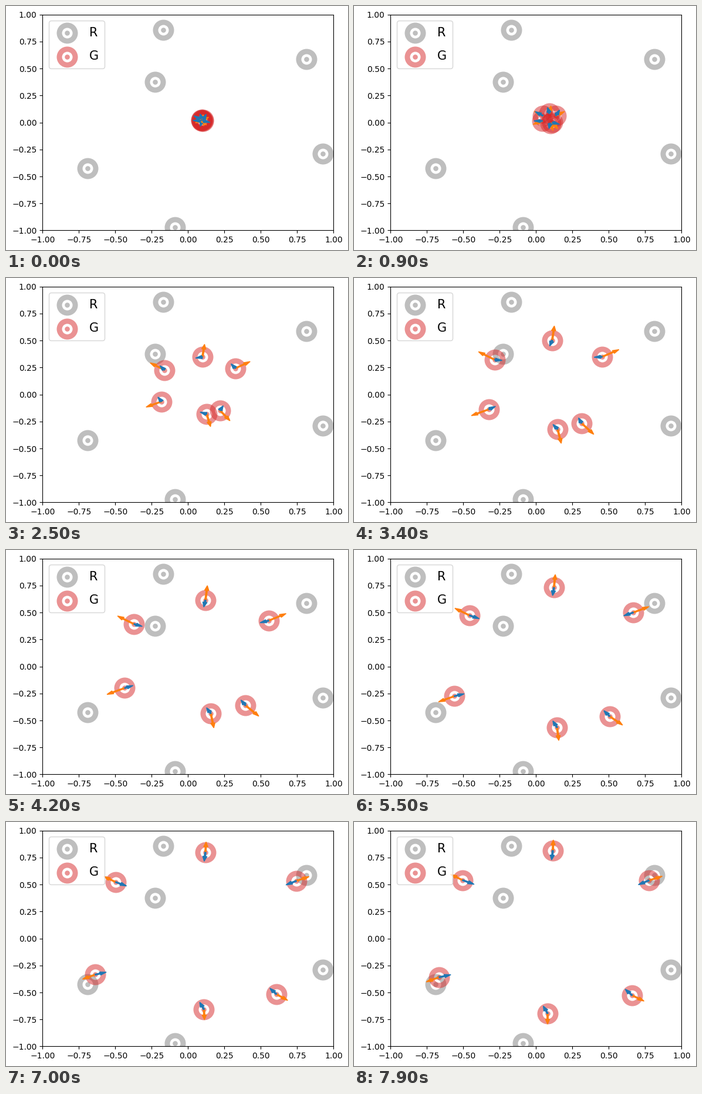
Animation, 583 px wide and 418 px high, one loop 8000 ms. Source, as a matplotlib script:

```python
import numpy as np
import matplotlib.pyplot as plt
from matplotlib.animation import FuncAnimation
from matplotlib.path import Path

W, H, DPI = 583, 418, 100
FRAMES, STEP = 80, 100

KEYS = np.array([16, 34, 42, 55, 70, 79]) / 79
START = np.array([0.097, 0.020])

RESOURCES = [(-0.171, 0.858), (0.813, 0.590), (-0.227, 0.376),
             (0.926, -0.289), (-0.691, -0.424), (-0.090, -0.973)]

# Per agent: waypoints, velocity heading (first, last), force (first, last)
AGENTS = [
    dict(x=[-.034, -.284, -.373, -.457, -.498, -.505],
         y=[.128, .323, .393, .474, .523, .541],
         heading=(146, 147), force=[(-.013, .010), (.039, -.019)]),
    dict(x=[-.042, -.324, -.437, -.562, -.639, -.667],
         y=[-.008, -.137, -.200, -.275, -.335, -.359],
         heading=(206, 206), force=[(-.010, .001), (.038, .011)]),
    dict(x=[.091, .111, .119, .123, .119, .115],
         y=[.187, .501, .617, .731, .799, .815],
         heading=(82, 88), force=[(-.003, .008), (-.004, -.042)]),
    dict(x=[.204, .454, .555, .668, .744, .777],
         y=[.133, .350, .425, .501, .534, .539],
         heading=(33, 23), force=[(.003, .010), (-.035, -.019)]),
    dict(x=[.107, .148, .156, .144, .109, .079],
         y=[-.062, -.321, -.435, -.565, -.657, -.695],
         heading=(-75, -90), force=[(-.002, -.004), (-.012, .028)]),
    dict(x=[.144, .313, .394, .506, .607, .660],
         y=[-.045, -.267, -.359, -.462, -.516, -.527],
         heading=(-58, -33), force=[(.006, -.001), (-.019, .023)]),
]

# Smooth curves for speed and for the turn of the force
ALL_KEYS = np.r_[0, KEYS]
SPEED = np.polyfit(ALL_KEYS, [.001, .047, .094, .088, .073, .055, .052], 4)
TURN = np.polyfit(ALL_KEYS, [-.05, 0, .37, .55, .75, .92, 1], 4)


def path_fit(points):
    """Track that leaves its start from rest: start + u^2 * poly(u)."""
    start = START + 0.008 * (points[-1] - START)
    poly = np.polyfit(KEYS, (points - start) / KEYS[:, None] ** 2, 4, w=KEYS ** 2)
    return start, poly


def target_marker():
    """Ring with a dot in the middle, as one filled path."""
    circle = Path.unit_circle()
    scales = [(18, 18), (-9, 9), (4.3, 4.3)]
    return Path.make_compound_path(
        *[Path(circle.vertices * s, circle.codes) for s in scales])


tracks = [path_fit(np.column_stack([a["x"], a["y"]])) for a in AGENTS]


def state(agent, track, u):
    start, poly = track
    pos = start + u ** 2 * np.array([np.polyval(poly[:, k], u) for k in (0, 1)])
    angle = np.radians(np.interp(u, [KEYS[0], 1], agent["heading"]))
    speed = max(np.polyval(SPEED, u), 0.001)
    vel = speed * np.array([np.cos(angle), np.sin(angle)])
    first, last = np.array(agent["force"])
    force = first + (last - first) * np.polyval(TURN, u)
    return pos, vel, force


fig = plt.figure(figsize=(W / DPI, H / DPI), dpi=DPI)
ax = fig.add_axes([62.4 / W, 33.6 / H, 496 / W, 369.6 / H])

style = dict(marker=target_marker(), s=25.92 ** 2, alpha=0.5, linewidths=0)
ax.scatter(*zip(*RESOURCES), color="tab:gray", label="R", **style)
dots = ax.scatter([START[0]] * len(AGENTS), [START[1]] * len(AGENTS),
                  color="tab:red", label="G", **style)


def arrow(color):
    return ax.arrow(0, 0, 0.1, 0, width=0.01, color=color)


arrows = [(arrow("tab:orange"), arrow("tab:blue")) for _ in AGENTS]

ax.set_xlim(-1, 1)
ax.set_ylim(-1, 1)
ax.legend(loc="upper left", fontsize=15, borderpad=0.5, labelspacing=1)


def update(i):
    u = i / (FRAMES - 1)
    spots = []
    for agent, track, pair in zip(AGENTS, tracks, arrows):
        pos, *vectors = state(agent, track, u)
        spots.append(pos)
        for arr, (dx, dy) in zip(pair, vectors):
            arr.set_data(x=pos[0], y=pos[1], dx=dx, dy=dy)
    dots.set_offsets(spots)
    return [dots]


anim = FuncAnimation(fig, update, frames=FRAMES, interval=STEP,
                     repeat=True, repeat_delay=0, blit=False)
plt.show()
```
